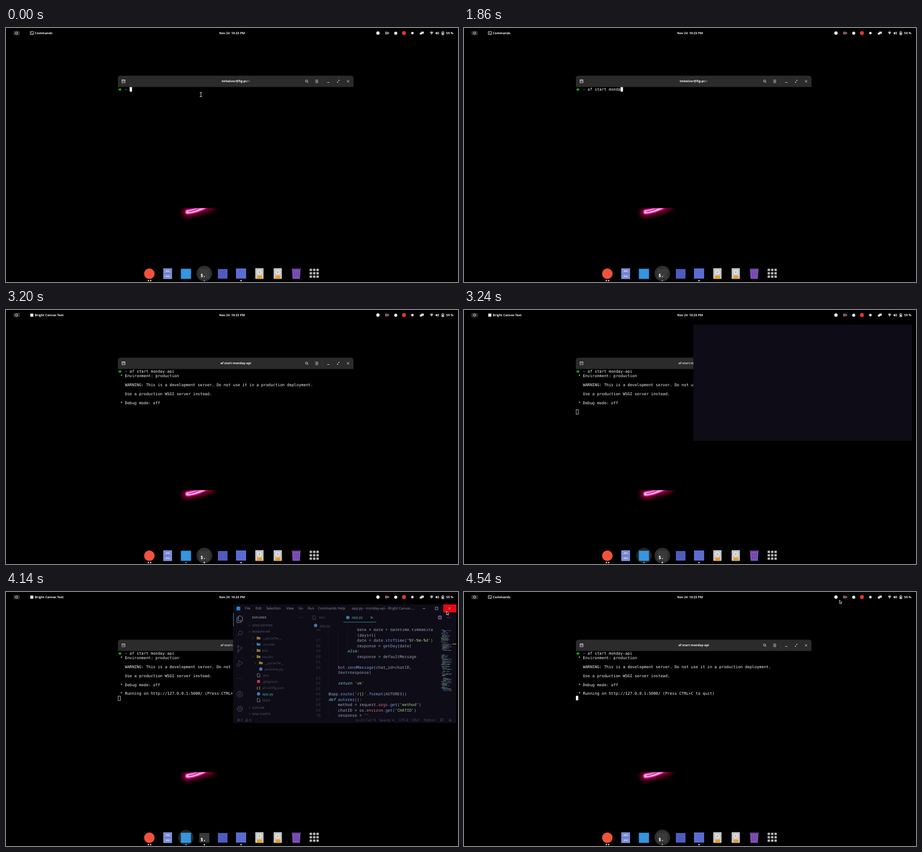
An HTML page that plays this animation: 800 by 450 pixels, repeating every 4560 ms.

```html
<!DOCTYPE html>
<html lang="en">
<head>
<meta charset="utf-8">
<title>Desktop session</title>
<style>
html, body { margin: 0; width: 100%; height: 100%; overflow: hidden; background: #000; }
svg { display: block; width: 800px; height: 450px; }
text { white-space: pre; text-rendering: geometricPrecision; font: 6.2px "Open Sans", "Noto Sans", sans-serif; }
.bar text, .title { font-size: 5.5px; font-weight: 700; fill: #f2f2f2; }
.mid { text-anchor: middle; }
.end { text-anchor: end; }
.mono text { font: 6.92px "DejaVu Sans Mono", "Noto Sans Mono", monospace; fill: #f4f4f4; }
.line { fill: none; stroke: currentColor; stroke-width: .8; }
#editor { color: #4d4965; }
#editor text { fill: #514d68; }
#menu text { fill: #8e8aa8; }
#editor #menu text { fill: #8e8aa8; }
#editor .small { font-size: 5.1px; font-weight: 600; }
#editor .hot { fill: #4fb8a6; }
#editor .lit { fill: #9a96b4; }
#editor #code text { font: 7px "Noto Sans Mono", "DejaVu Sans Mono", monospace; fill: #a5a1be; }
#editor #code .num { fill: #39364a; }
.rich .s { fill: #a9d08a; }
.rich .k { fill: #79cfe8; font-style: italic; }
.rich .n { fill: #e88b6a; }
.rich .f { fill: #7d9fe8; }
.rich .o { fill: #79c3dd; }
.rich .p { fill: #d9737c; }
#map path { stroke: #6d6983; stroke-width: .8; opacity: .75; }
.rich #map .s { stroke: #8fb573; }
.rich #map .k { stroke: #5fa9c2; }
.rich #map .f { stroke: #6c86c8; }
</style>
</head>
<body>
<svg viewBox="0 0 800 450">
  <defs>
    <clipPath id="below"><path d="M250 319.3H450V380H250Z"/></clipPath>
    <clipPath id="codeArea"><path d="M534 65H797V222H534Z"/></clipPath>
    <filter id="blur" x="-50%" y="-100%" width="200%" height="300%"><feGaussianBlur stdDeviation="4"/></filter>
  </defs>
  <rect width="800" height="450"/>

  <!-- neon wallpaper -->
  <g clip-path="url(#below)" fill="none" stroke-linecap="round">
    <path d="M320 327L362 315" stroke="#a00438" stroke-width="15" filter="url(#blur)"/>
    <path d="M321.5 325.8Q340 324 360 312" stroke="#e3129c" stroke-width="9.5"/>
    <path d="M321.5 325.8Q340 324 359 312" stroke="#eda0dc" stroke-width="6"/>
    <path d="M324 325.5Q334 324 344 318" stroke="#d41c9a" stroke-width="1.6"/>
    <path d="M319 327.5Q342 326 359 315" stroke="#ffe3f7" stroke-width=".8" stroke-dasharray="1 .8"/>
  </g>

  <!-- top bar -->
  <g class="bar" color="#eee" fill="#eee">
    <rect x="13" y="5.2" width="11.5" height="7.8" rx="2" fill="#2c2c2c"/>
    <circle cx="18.7" cy="9" r="2" class="line" stroke-width="1.2"/>
    <g id="barShell"><path class="line" d="M43 6.2H48.6V11.6H43ZM44.2 7.8L45.4 8.8L44.2 9.8M46 10.2H47.5"/><text x="51" y="11">Commands</text></g>
    <g id="barEditor"><rect x="43" y="6.4" width="5.4" height="5.4"/><text x="51" y="11">Bright Canvas Text</text></g>
    <text x="400" y="11" class="mid">Nov 24  10:23 PM</text>
    <circle cx="658.3" cy="9" r="3"/>
    <g id="cam" fill="currentColor"><path class="line" d="M671.5 7H675.5V11H671.5Z"/><path d="M676 9L678 7V11ZM672.5 8H674.5V10H672.5Z"/></g>
    <circle cx="689.8" cy="9.2" r="2.7"/>
    <circle cx="704.3" cy="9" r="3.4" fill="#e8372c"/>
    <circle cx="719.3" cy="9" r="2.3"/>
    <path d="M735 6.5H739.5V10H735ZM732.5 8.3H736.5V11.6H732.5Z"/>
    <path d="M750.3 7.4Q753.3 5.2 756.3 7.4L753.3 11.7Z" opacity=".75"/>
    <path d="M760.3 8H761.5L763.2 6.4V11.8L761.5 10.2H760.3Z"/>
    <path class="line" d="M764.2 7.5Q765.2 9 764.2 10.7M765.2 6.6Q767 9 765.2 11.6"/>
    <path class="line" d="M771.2 7H775V12H771.2ZM772.3 6.2H774"/><path d="M772 8.6H774.2V11.3H772Z"/>
    <text x="779" y="11">59 %</text>
  </g>

  <!-- shell window -->
  <path d="M198 104.5V89.5Q198 84.5 203 84.5H610Q615 84.5 615 89.5V104.5Z" fill="#2b2b2b"/>
  <g color="#e6e6e6" id="head">
    <path class="line" d="M205.3 91.7H210.7V97H205.3ZM205.3 93.2H210.7M208 93.4V95.3"/>
    <text id="title" class="title mid" x="406.5" y="96.4"></text>
    <circle class="line" cx="532" cy="94" r="1.9"/>
    <path class="line" d="M533.4 95.4L535 97M547.5 92.3H552.5M547.5 94.5H552.5M547.5 96.7H552.5M568.5 96.5H572.5M588 93.2L590 92.2M586 96.5L587.5 95.5M603.5 92.6L607.3 96.4M607.3 92.6L603.5 96.4"/>
    <path d="M586 94.8V96.8H588ZM588.2 92.2H590V94Z" fill="currentColor"/>
    <path d="M560 88V101" stroke="#3b3b3b" stroke-width=".7"/>
  </g>
  <g class="mono">
    <path d="M198.6 109H202M201 106.8L203.4 109L201 111.2" fill="none" stroke="#27c315" stroke-width="1.4"/>
    <text x="210.5" y="111.2" style="fill:#1fb5cc;font-weight:700">~</text>
    <text id="cmd" x="218.8" y="111.2"></text>
    <g id="output"></g>
    <rect id="cursor" width="4.2" height="8"/>
  </g>

  <!-- dock -->
  <g id="dock">
    <circle id="ringEditor" cx="318.5" cy="435" r="13.6" fill="#242424"/>
    <circle id="ringShell" cx="351" cy="435" r="13.8" fill="#2f2f2f"/>
    <circle cx="253.7" cy="435.3" r="9.3" fill="#f0533c"/>
    <rect x="278.3" y="425.8" width="15.6" height="19" rx="1" fill="#8190d6"/>
    <path d="M278.3 435.3H293.9" stroke="#5a68ad"/>
    <path d="M283.5 431.8V430.5H288.7V431.8M283.5 441V439.7H288.7V441" fill="none" stroke="#e9edff"/>
    <rect x="309.5" y="426.5" width="18" height="18" fill="#3595e0"/>
    <rect x="342.2" y="427" width="17.6" height="17" rx="1" fill="#3a3a3a"/>
    <text x="344.3" y="441" style="font:700 8px 'DejaVu Sans Mono',monospace;fill:#fff">$.</text>
    <rect x="375" y="427" width="17" height="17" fill="#4f5bbd"/>
    <rect x="407" y="426" width="18" height="18" fill="#5b6bd0"/>
    <path d="M506.2 427H521.2L520.2 444.5H507.2Z" fill="#7e51b4"/>
    <path d="M505.5 427H522" stroke="#59358a" stroke-width="2"/>
    <path d="M510.5 431V441M513.7 431V441M517 431V441" stroke="#64409a"/>
    <g fill="#f2f2f2"><circle cx="252" cy="447.4" r="1.2"/><circle cx="256" cy="447.4" r="1.2"/><circle cx="416" cy="447.4" r="1.2"/></g>
    <circle id="dotEditor" cx="318.7" cy="447.4" r="1.2" fill="#62aee8"/>
    <circle id="dotShell" cx="351" cy="447.4" r="1.2"/>
  </g>

  <!-- editor window -->
  <g id="editor">
    <rect x="402" y="22" width="395" height="210" fill="#0e0c16"/>
    <g id="frame">
      <rect x="408" y="26" width="6.5" height="6.5" fill="#2488d0"/>
      <g id="menu"></g>
      <rect id="hover" x="774" y="22" width="23" height="14.2" fill="#e50914"/>
      <path class="line" color="#a5a1ba" d="M737.5 29.3H742M759.7 26.8H764.3V31.4H759.7ZM783 27L787 31M787 27L783 31"/>
      <rect x="402" y="37" width="1" height="23.5" fill="#2f8693"/>
      <g class="line" stroke-width="1">
        <path color="#9c99b5" stroke="currentColor" d="M411.5 42.5H416L418.5 45V51H411.5ZM411.5 45H408.8V54H415.7V51"/>
        <circle cx="414.8" cy="72.6" r="3.6"/><path d="M412.2 75.2L408.7 79"/>
        <circle cx="411" cy="96.5" r="1.6"/><circle cx="411" cy="105" r="1.6"/><circle cx="416.7" cy="98.5" r="1.6"/>
        <path d="M411 98V103.4M416.7 100Q416.7 102.5 411 103"/>
        <path d="M412 126V121.5L419 126L413.5 130"/><circle cx="411" cy="129.5" r="2.3"/>
        <path d="M409 153H410.2M413 153H414.2M417 153H418.2" stroke-width="1.2"/>
        <circle cx="413.7" cy="181" r="5.2"/><circle cx="413.7" cy="179.6" r="2"/><path d="M410 184.7Q413.7 180.5 417.4 184.7"/>
        <circle cx="413.7" cy="207" r="1.7"/><circle cx="413.7" cy="207" r="4.5" stroke-width="1.6" stroke-dasharray="2.3 1.2"/>
      </g>
    </g>
    <g id="body">
      <g id="tree"></g>
      <g id="early"></g>
      <g id="late"></g>
      <path class="line" d="M543 42.3H546.5L548 43.8V48.5H543Z"/>
      <text x="552.5" y="47.4">.env</text>
      <circle cx="605" cy="45.2" r="3" fill="#3c7bb0"/>
      <text x="612" y="47.4" class="hot">app.py</text>
      <path class="line" color="#aaa6c0" d="M645.4 43.4L649 47M649 43.4L645.4 47M765.2 42.6H770.6V47.8H765.2ZM768 42.6V47.8M780.5 45.3H781.5M783 45.3H784M785.5 45.3H786.5"/>
      <path d="M597 53.4H655.5" stroke="#2f8693" stroke-width=".9"/>
      <circle cx="548" cy="59.3" r="3" fill="#3c7bb0"/>
      <text x="554.7" y="61.5">app.py</text>
      <g id="code" clip-path="url(#codeArea)"></g>
      <path d="M790 92.2H797" stroke="#c58a20" stroke-width="1.2"/>
      <g class="line"><circle cx="411.5" cy="226.8" r="2"/><path d="M410.6 226L412.4 227.7M412.4 226L410.6 227.7M423.5 229L426 224.6L428.5 229ZM769 224.5H773.5V228H771L769.5 229.5ZM784 228.3H788L787.3 227V225.5Q786 223.5 784.7 225.5V227Z"/></g>
      <text x="415.5" y="229">0</text><text x="430.5" y="229">0</text>
      <g id="status"></g>
      <text id="lang" class="end" x="760" y="229"></text>
    </g>
  </g>

  <!-- pointers -->
  <g id="beam" fill="none" stroke-linecap="square">
    <path d="M-1.6 -3.5H1.6M0 -3.5V3.5M-1.6 3.5H1.6" stroke="#000" stroke-width="2"/>
    <path d="M-1.6 -3.5H1.6M0 -3.5V3.5M-1.6 3.5H1.6" stroke="#ddd" stroke-width=".9"/>
  </g>
  <path id="arrow" d="M0 0V6.3L1.5 5L2.5 7.1L3.5 6.6L2.6 4.6H4.6Z" fill="#111" stroke="#eee" stroke-width=".7"/>
</svg>

<script>
const LOOP = 4560, STEP = 20;
const CELL = 4.167, ROW = 7.917, LEFT = 198, TOP = 104.7;
const $ = id => document.getElementById(id);
const show = (id, on) => { $(id).style.display = on ? '' : 'none'; };
const label = (x, y, s, cls = '') => `<text x="${x}" y="${y}" class="${cls}">${s}</text>`;
const put = (id, parts) => { $(id).innerHTML = parts.join(''); };

// shell output, keyed by row
const output = {
  1: ' * Environment: production',
  3: '   WARNING: This is a development server. Do not use it in a production deployment.',
  5: '   Use a production WSGI server instead.',
  7: ' * Debug mode: off',
  9: ' * Running on http://127.0.0.1:5000/ (Press CTRL+C to quit)'
};
put('output', Object.entries(output).map(([r, s]) =>
  `<text id="out${r}" x="${LEFT}" y="${TOP + 6.5 + r * ROW}">${s}</text>`));

// dock drives and app grid
let dock = '';
for (const x of [448.5, 481])
  dock += `<rect x="${x - 7.3}" y="425.5" width="14.6" height="19" rx="1" fill="#c8c8c8"/>
    <circle cx="${x}" cy="432.5" r="5.3" fill="#dedede" stroke="#aaa" stroke-width=".6"/><circle cx="${x}" cy="432.5" r="1.2" fill="#999"/>
    <rect x="${x - 4}" y="438.8" width="8.6" height="5.4" rx="1.4" fill="#f29a1f"/>`;
for (let i = 0; i < 9; i++)
  dock += `<rect x="${537.4 + i % 3 * 6}" y="${426.4 + (i / 3 | 0) * 6}" width="4.2" height="4.2" rx=".6" fill="#bdbdbd"/>`;
$('dock').insertAdjacentHTML('beforeend', dock);

// editor menu
const menu = { File: 423, Edit: 441.5, Selection: 460.5, View: 496, Go: 517.5, Run: 534, Commands: 552, Help: 587 };
put('menu', [...Object.entries(menu).map(([s, x]) => label(x, 31.2, s)),
  label(612, 31.2, 'app.py - monday-api - Bright Canvas ...')]);

// explorer
const chevron = (x, y, open) =>
  `<path class="line" d="${open ? `M${x - 1.5} ${y - .8}l1.5 1.6l1.5 -1.6` : `M${x - .8} ${y - 1.5}l1.6 1.5l-1.6 1.5`}"/>`;
const section = (y, s, open) => chevron(431, y, open) + label(435.5, y + 1.9, s, 'small');
const icons = {
  dir: (x, y, c = '#8d7836') => `<path d="M${x - 3.3} ${y - 2.5}h2.6l.8 1h3.2v4h-6.6z" fill="${c}"/>`,
  blue: (x, y) => icons.dir(x, y, '#2f78b8'),
  py: (x, y) => `<circle cx="${x}" cy="${y}" r="2.9" fill="#3c7bb0"/>`,
  doc: (x, y) => `<path class="line" color="#8b879f" d="M${x - 2.2} ${y - 3}h3l1.6 1.6v4.4h-4.6z"/>`,
  git: (x, y) => `<rect x="${x - 2.5}" y="${y - 2.5}" width="5" height="5" fill="#c93b4c"/>`,
  json: (x, y) => `<text x="${x}" y="${y + 2}" class="mid" style="fill:#c0a23c;font-weight:700">{ }</text>`,
  man: (x, y) => `<path d="M${x} ${y - 3}v3l-1.5 3M${x} ${y}l1.5 3M${x - 1.5} ${y - .8}h3" stroke="#c9a227" fill="none"/>`
};
const entry = ([icon, name, depth, arrow, cls], i) => {
  const y = 81.5 + i * 11, dx = depth * 4;
  return (arrow ? chevron(437 + dx, y, arrow === 'v') : '') + icons[icon](447 + dx, y) + label(453.5 + dx, y + 2.1, name, cls);
};
const files = [
  ['dir', '__pycache__', 0, '>'], ['blue', '.vscode', 0, '>'], ['dir', 'env', 0, '>'], ['dir', 'results', 0, 'v'],
  ['dir', '__pycache__', 1, '>'], ['py', 'amizone.py', 1], ['doc', '.env', 0], ['git', '.gitignore', 0],
  ['json', 'af-config.json', 0], ['py', 'app.py', 0, '', 'hot'], ['doc', 'lib64', 0]
];
put('tree', [label(435.5, 46.9, 'EXPLORER', 'small lit'), '<path class="line" d="M519.5 45h1M522 45h1M524.5 45h1"/>',
  section(59.5, 'OPEN EDITORS'), section(70.5, 'MONDAY-API', true), ...files.map(entry)]);
put('early', [entry(['man', 'LICENSE', 0], 11), section(216, 'OUTLINE')]);
put('late', [section(205, 'OUTLINE'), section(216, 'NPM SCRIPTS')]);
put('status', Object.entries({ 'Ln 23, Col 15': 648, 'Spaces: 4': 680, 'UTF-8': 705, 'CRLF': 725 })
  .map(([s, x]) => label(x, 229, s, 'end')));

// program text: [line number, indent, text]
const program = [
  [56, 12, 'date = date + datetime.timedelta'], ['', 12, '(days=1)'],
  [57, 12, "date = date.strftime('%Y-%m-%d')"], [58, 12, 'response = getDay(date)'],
  [59, 8, 'else:'], [60, 12, 'response = defaultMessage'], [61, 0, ''],
  [62, 4, 'bot.sendMessage(chat_id=chatID,'], ['', 4, 'text=response)'], [63, 0, ''],
  [64, 4, "return 'ok'"], [65, 0, ''], [66, 0, "@app.route('/{}'.format(AUTORES))"],
  [67, 0, 'def autores():'], [68, 4, "method = request.args.get('method')"],
  [69, 4, "chatID = os.environ.get('CHATID')"], [70, 4, "response = ''"]
];
const token = /('[^']*')|\b(return|def|else)\b|(\d+)|(\w+)(?=\()|\b(args|environ)\b|([=+.@])/g;
const colour = s => s.replace(token, (m, ...g) =>
  `<tspan class="${'sknfpo'[g.slice(0, 6).findIndex(v => v !== undefined)]}">${m}</tspan>`);
let seed = 7;
const rand = () => (seed = seed * 16807 % 2147483647) / 2147483647;
let map = '';
for (let y = 66; y < 176; y += 1.25) {
  if (rand() < .14) continue;
  let x = 770 + Math.floor(rand() * 3) * 1.7;
  for (let n = 1 + rand() * 3 | 0; n--;) {
    const w = 2 + rand() * 5;
    map += `<path class="${'skfo'[rand() * 4 | 0]}" d="M${x.toFixed(1)} ${y}h${Math.max(0, Math.min(w, 789 - x)).toFixed(1)}"/>`;
    x += w + .6;
  }
}
put('code', [
  '<path d="M571 65V167M587.7 65V129M604.5 65V120M571 196V222" stroke="#211e2e" stroke-width=".5"/>',
  ...program.map(([n, indent, s], i) => {
    const y = 69.4 + i * 9.5;
    return label(557, y, n, 'num end') + label(570.8 + indent * 4.2, y, colour(s));
  }),
  `<g id="map">${map}</g>`
]);

// typing, with one space deleted and typed again
const command = 'af start monday-api';
const keys = [140, 240, 340, 560, 640, 740, 820, 960, 1020, 1260, 1400, 1540, 1620, 1700, 1780, 1860, 2160, 2480, 2560, 2620, 2760];
const typed = t => {
  const n = keys.filter(k => k <= t).length;
  return n < 10 ? n : n === 10 ? 8 : n - 2;
};

const path = [[3540, 345, 118], [3640, 367.5, 153], [4140, 779.5, 34], [4220, 782, 31], [4300, 780, 31], [4540, 664.5, 14]];
const smooth = u => u * u * (3 - 2 * u);
function pointerAt(t) {
  const i = path.findIndex(p => p[0] >= t);
  if (i < 0) return path.at(-1).slice(1);
  if (i === 0) return path[0].slice(1);
  const [t0, x0, y0] = path[i - 1], [t1, x1, y1] = path[i];
  const u = smooth((t - t0) / (t1 - t0));
  return [x0 + (x1 - x0) * u, y0 + (y1 - y0) * u];
}

function drawPointer(t) {
  const [x, y] = pointerAt(t);
  const inCode = t < 4220 && x > 560 && x < 768 && y > 64 && y < 222;
  const beam = x < 402 || inCode;
  const visible = t < 140 || t >= 3540;
  show('beam', visible && beam);
  show('arrow', visible && !beam);
  $(beam ? 'beam' : 'arrow').setAttribute('transform', `translate(${x} ${y})`);
  show('hover', t < 4300 && x >= 774 && y >= 22 && y < 36.2);
}

function drawShell(t, focused) {
  const len = typed(t);
  $('cmd').textContent = command.slice(0, len);
  $('title').textContent = t < 2900 ? 'tmkelvor@fig-pc:~' : command;
  $('head').style.opacity = focused ? 1 : .8;
  for (const r in output) show('out' + r, t >= (r === '9' ? 3280 : 3160));
  const row = t < 2840 ? 0 : t < 3160 ? 1 : t < 3280 ? 9 : 10;
  const cursor = $('cursor'), inset = focused ? 0 : .4;
  cursor.setAttribute('x', LEFT + (row ? 0 : 5 + len) * CELL + inset);
  cursor.setAttribute('y', TOP + row * ROW + inset);
  cursor.setAttribute('fill', focused ? '#fff' : 'none');
  cursor.setAttribute('stroke', focused ? 'none' : '#ddd');
  cursor.setAttribute('stroke-width', .7);
  show('cursor', t < 3160 || t >= 3220);
}

function drawEditor(t) {
  const rich = t >= 3820;
  show('editor', t >= 3220 && t < 4340);
  show('frame', t >= 3340);
  show('body', t >= 3480);
  show('early', t < 3920);
  show('late', t >= 3920);
  $('code').classList.toggle('rich', rich);
  $('lang').textContent = rich ? 'Python' : 'Plain Text';
  $('status').setAttribute('transform', `translate(${rich ? 7 : 0} 0)`);
  const out = Math.min(1, Math.max(0, (t - 4200) / 140));
  const back = Math.min(1, Math.max(0, (3280 - t) / 40));
  const scale = 1 - .02 * back * back - .2 * out;
  $('editor').style.opacity = t < 3240 ? .6 : 1 - out;
  $('editor').setAttribute('transform', `translate(599.5 ${127 + 2 * back}) scale(${scale}) translate(-599.5 -127)`);
}

function draw(t) {
  const focused = t < 3220 || t >= 4220;
  const editorOpen = t >= 3120 && t < 4220;
  show('barEditor', editorOpen);
  show('barShell', !editorOpen);
  show('dotEditor', editorOpen);
  show('ringEditor', t >= 3220 && t < 4260);
  show('ringShell', t < 3280 || t >= 4220);
  $('dotShell').setAttribute('fill', editorOpen ? '#f2f2f2' : '#8a8a8a');
  $('cam').setAttribute('color', t < 60 ? '#c4c4c4' : '#d98a92');
  drawShell(t, focused);
  drawEditor(t);
  drawPointer(t);
}

const start = performance.now();
function tick() {
  const t = (performance.now() - start) % LOOP;
  draw(Math.floor(t / STEP) * STEP);
  requestAnimationFrame(tick);
}
tick();
</script>
</body>
</html>
```
